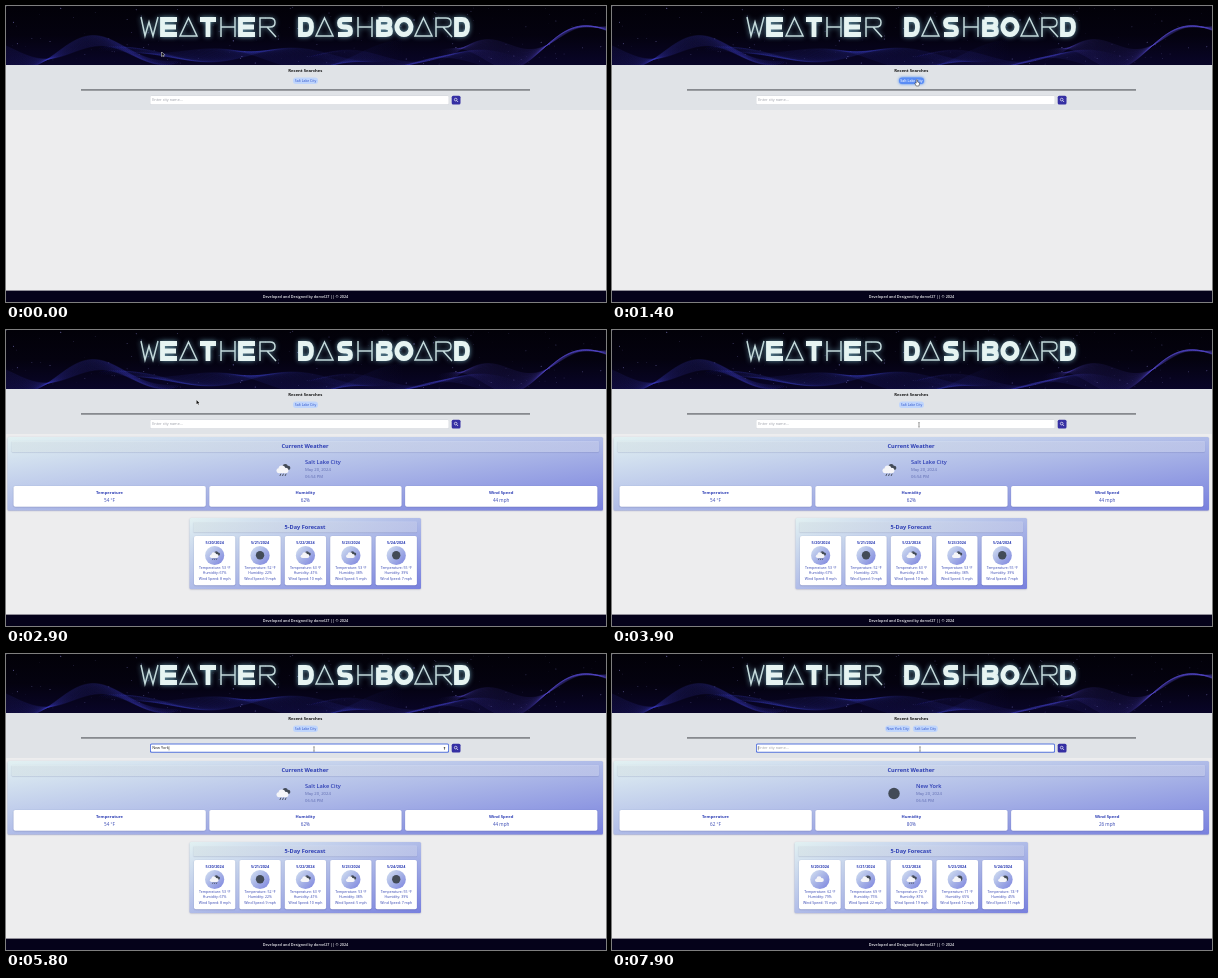
Write an HTML page with a canvas that moves like this. It is 600 by 296 pixels and loops after 8 s.

```html
<!DOCTYPE html>
<html lang="en">
<head>
<meta charset="utf-8">
<title>Weather Dashboard</title>
<style>
html, body { margin: 0; width: 100%; height: 100%; overflow: hidden; background: #ededee; }
canvas { display: block; width: 600px; height: 296px; }
</style>
</head>
<body>
<canvas id="stage"></canvas>
<script>
const W = 600, H = 296, LOOP = 8000;
const FONT = '"Open Sans", "Noto Sans", sans-serif';
const BLUE = '#2c3db4';
const canvas = document.getElementById('stage');
const dpr = window.devicePixelRatio || 1;
canvas.width = W * dpr;
canvas.height = H * dpr;
let ctx = canvas.getContext('2d');

const SALT_LAKE = {
  city: 'Salt Lake City', icon: 'rain', x: 299, now: ['54 °F', '62%', '44 mph'], grow: 0,
  days: [['rain', 53, 67, 8], ['moon', 52, 22, 9], ['cloud', 63, 41, 10], ['cloud', 53, 38, 5], ['moon', 55, 39, 7]]
};
const NEW_YORK = {
  city: 'New York', icon: 'moon', x: 304, now: ['62 °F', '80%', '26 mph'], grow: 1,
  days: [['white', 62, 79, 15], ['night', 69, 75, 22], ['rain', 72, 81, 19], ['night', 71, 65, 12], ['night', 74, 45, 11]]
};
const SUGGESTIONS = ['denver', 'Street, address', 'salt lake city', 'valley, area', 'venice', 'salt lake city'];
const QUERY = 'New York City';
const SHOW_FIRST = 1450, FOCUS = 4100, TYPE_START = 4900, TYPE_STEP = 125, SUBMIT = 7400, SHOW_SECOND = 7500;
const POINTER = [[0, 156, 48], [1250, 305, 76], [2000, 305, 76], [2750, 191, 72], [3050, 191, 72], [3950, 308, 95], [LOOP, 308, 95]];

function random(seed) {
  return () => (seed = (seed * 16807) % 2147483647) / 2147483647;
}

function text(str, x, y, size, color, weight = 400, align = 'center') {
  ctx.font = `${weight} ${size}px ${FONT}`;
  ctx.textAlign = align;
  ctx.textBaseline = 'middle';
  ctx.fillStyle = color;
  ctx.fillText(str, x, y);
}

function box(x, y, w, h, r, fill, shadow = 0) {
  ctx.save();
  if (shadow) {
    ctx.shadowColor = 'rgba(30,35,100,.3)';
    ctx.shadowBlur = shadow * dpr;
    ctx.shadowOffsetY = 0.5 * dpr;
  }
  ctx.fillStyle = fill;
  ctx.beginPath();
  ctx.roundRect(x, y, w, h, r);
  ctx.fill();
  ctx.restore();
}

function disc(x, y, r, fill) {
  ctx.fillStyle = fill;
  ctx.beginPath();
  ctx.arc(x, y, r, 0, 7);
  ctx.fill();
}

function line(points, color, width) {
  ctx.strokeStyle = color;
  ctx.lineWidth = width;
  ctx.beginPath();
  points.forEach(([x, y]) => ctx.lineTo(x, y));
  ctx.stroke();
}

// Corner-to-corner gradient, like CSS "to bottom right".
function cornerGradient(x, y, w, h, ...colors) {
  const k = w * h / (w * w + h * h), cx = x + w / 2, cy = y + h / 2;
  const g = ctx.createLinearGradient(cx - h * k, cy - w * k, cx + h * k, cy + w * k);
  colors.forEach((c, i) => g.addColorStop(i / (colors.length - 1), c));
  return g;
}

// Banner

function ribbon(x0, x1, count, rgb, alpha, height) {
  const g = ctx.createLinearGradient(x0, 0, x1, 0);
  g.addColorStop(0, `rgba(${rgb},${x0 > 0 ? 0 : alpha})`);
  g.addColorStop(0.3, `rgba(${rgb},${alpha})`);
  g.addColorStop(0.75, `rgba(${rgb},${alpha})`);
  g.addColorStop(1, `rgba(${rgb},${x1 < W ? 0 : alpha})`);
  for (let i = 0; i < count; i++) {
    const points = [];
    for (let x = x0; x <= x1; x += 2) points.push([x, height(x, i / count)]);
    line(points, g, 0.4);
  }
}

const GLYPHS = {
  W: 'M0 0L4 19L8 5L12 19L17 0',
  E: 'M17 2.5H2.5V17.5H17M3 10H16',
  A: 'M8.5 1L17 19H0Z',
  T: 'M0 2.5H16M8 2.5V20',
  H: 'M1 0V20M15 0V20M1 10H15',
  R: 'M1 20V1H11Q16 1 16 5.5Q16 10 11 10H1M8 10L17 20',
  D: 'M2.5 2.5H8Q13.5 2.5 13.5 10Q13.5 17.5 8 17.5H2.5Z',
  S: 'M15 2.5H6Q2.5 2.5 2.5 6Q2.5 10 7 10H9Q13.5 10 13.5 14Q13.5 17.5 10 17.5H1',
  B: 'M2.5 2.5H10Q14 2.5 14 6Q14 10 9 10H2.5M9 10Q14.5 10 14.5 14Q14.5 17.5 10 17.5H2.5V2.5',
  O: 'M9 2.5A7 7.5 0 1 1 8.9 2.5Z'
};
const TITLE = [['WEATHER', [135, 154, 174, 194, 214, 232, 253]], ['DASHBOARD', [292, 310, 331, 351, 370, 389, 409, 429, 448]]];

function drawTitle() {
  for (const [word, xs] of TITLE) {
    [...word].forEach((ch, i) => {
      const path = new Path2D(GLYPHS[ch]), solid = 'ETDSBO'.includes(ch);
      ctx.save();
      ctx.translate(xs[i], 11);
      ctx.lineJoin = 'miter';
      ctx.shadowColor = 'rgba(120,180,200,.8)';
      ctx.shadowBlur = 5 * dpr;
      ctx.strokeStyle = solid ? '#e6f4f2' : '#c4dadb';
      ctx.lineWidth = solid ? 4.8 : 1.5;
      ctx.stroke(path);
      ctx.restore();
    });
  }
}

function drawBanner() {
  const sky = ctx.createLinearGradient(0, 0, 0, 59);
  sky.addColorStop(0, '#020108');
  sky.addColorStop(0.5, '#04020f');
  sky.addColorStop(1, '#090528');
  ctx.fillStyle = sky;
  ctx.fillRect(0, 0, W, 59);
  ctx.save();
  ctx.beginPath();
  ctx.rect(0, 0, W, 59);
  ctx.clip();
  ribbon(0, 175, 22, '60,60,200', 0.28, (x, k) => 43 + 8 * Math.sin(x / 19 + 5.9 + k * 0.9) + k * 13 * Math.cos(x / 34) + x * 0.05);
  ribbon(90, 400, 24, '55,60,195', 0.25, (x, k) => 49 + 7 * Math.sin(x / 26 + k * 2.2) + k * 9 * Math.sin(x / 41 + 1));
  ribbon(300, 520, 18, '60,58,190', 0.25, (x, k) => 50 + 6 * Math.sin(x / 21 + 1 + k * 1.8) + k * 8);
  ribbon(430, 600, 24, '85,72,210', 0.28, (x, k) => 48 - (x - 430) * 0.13 + 8 * Math.sin(x / 16 + k * 1.3) + k * 17 * Math.cos(x / 40));
  const rnd = random(4217);
  for (let i = 0; i < 160; i++) {
    disc(rnd() * W, rnd() * 58, 0.15 + rnd() * 0.4, `rgba(165,160,250,${0.2 + rnd() * 0.6})`);
  }
  ctx.restore();
  drawTitle();
}

function prerender(draw) {
  const layer = document.createElement('canvas'), main = ctx;
  layer.width = canvas.width;
  layer.height = Math.ceil(59 * dpr);
  ctx = layer.getContext('2d');
  ctx.scale(dpr, dpr);
  draw();
  ctx = main;
  return layer;
}

// Weather

function cloud(x, y, s, color) {
  disc(x - 2.8 * s, y + 0.8 * s, 2 * s, color);
  disc(x - 0.4 * s, y - 0.8 * s, 2.7 * s, color);
  disc(x + 2.7 * s, y + 0.6 * s, 2.2 * s, color);
  ctx.fillRect(x - 2.8 * s, y, 5.5 * s, 2.8 * s);
}

function weatherIcon(kind, x, y, s) {
  const dark = '#434b57';
  if (kind === 'moon') return disc(x, y, 4.4 * s, dark);
  if (kind === 'night') disc(x + 2.2 * s, y - 0.8 * s, 3.2 * s, dark);
  if (kind === 'rain' || kind === 'cloud') cloud(x + 2 * s, y - 1.7 * s, 0.75 * s, dark);
  cloud(x - 0.5 * s, y + 0.2 * s, 0.95 * s, '#f5f5f8');
  if (kind === 'rain') {
    for (let i = -1; i < 2; i++) {
      const dx = x + i * 2 * s;
      line([[dx + 0.4 * s, y + 3.2 * s], [dx - 0.4 * s, y + 5 * s]], dark, 0.7 * s);
    }
  }
}

function panel(x, y, w, h) {
  box(x, y, w, h, 1.5, cornerGradient(x, y, w, h, '#e2f1f2', '#b0bce8', '#7880de'), 1.5);
}

function heading(str, x, y, w) {
  const g = ctx.createLinearGradient(x, 0, x + w, 0);
  g.addColorStop(0, 'rgba(230,243,243,.7)');
  g.addColorStop(1, 'rgba(205,213,245,.7)');
  box(x, y, w, 11, 1, g, 1);
  text(str, 299, y + 6, 5.6, BLUE, 700);
}

function drawWeather(data) {
  panel(1.5, 107, 595.5, 73.5);
  heading('Current Weather', 5.5, 111, 587.5);
  weatherIcon(data.icon, data.x - 22, 139.5, 1.3);
  text(data.city, data.x, 132.6, 5.6, BLUE, 600, 'left');
  text('May 20, 2024', data.x, 139.8, 4.2, '#5f6cb2', 400, 'left');
  text('06:54 PM', data.x, 146.5, 4.2, '#5f6cb2', 400, 'left');
  ['Temperature', 'Humidity', 'Wind Speed'].forEach((label, i) => {
    const x = 7.5 + i * 195.8;
    box(x, 156, 192.3, 20.7, 1.8, '#fff', 1.5);
    text(label, x + 96, 163.4, 4.2, BLUE, 700);
    text(data.now[i], x + 96, 170.5, 4.6, '#3546b2');
  });

  const g = data.grow;
  panel(183.5 - g, 188, 231.5 + 2 * g, 71);
  heading('5-Day Forecast', 187.5 - g, 191.5, 223.5 + 2 * g);
  data.days.forEach(([icon, temp, humidity, wind], i) => {
    const w = 41.3 + g * 0.4, x = 188 - g + i * (45.4 + g * 0.4), cx = x + w / 2;
    box(x, 206, w, 49.3, 1.8, '#fff', 1.5);
    text(`5/${20 + i}/2024`, cx, 213, 3.8, BLUE, 700);
    disc(cx, 225.5, 9.6, cornerGradient(cx - 9.6, 216, 19.2, 19.2, '#d6e3f2', '#a6b2e6', '#7b82df'));
    weatherIcon(icon, cx, 225.3, 0.95);
    text(`Temperature: ${temp} °F`, cx, 237.7, 3.5, '#3142b0');
    text(`Humidity: ${humidity}%`, cx, 243.4, 3.5, '#3142b0');
    text(`Wind Speed: ${wind} mph`, cx, 249.1, 3.5, '#3142b0');
  });
}

// Search

function pill(label, cx, hover) {
  ctx.save();
  if (hover) {
    ctx.shadowColor = '#3b82f6';
    ctx.shadowBlur = 3 * dpr;
  }
  box(cx - 12.5, 71.5, 25, 6.4, 3, hover ? '#5b8df5' : '#bfd5fc');
  ctx.restore();
  text(label, cx, 74.8, 3.5, hover ? '#e6efff' : '#2b50c8', hover ? 600 : 400);
}

function drawInput(t, typed) {
  const focused = t >= FOCUS;
  box(144, 89.5, 299, 9.2, 1.5, focused ? '#5674dd' : '#d3d6dc');
  const inset = focused ? 0.9 : 0.4;
  box(144 + inset, 89.5 + inset, 299 - 2 * inset, 9.2 - 2 * inset, 1, '#fff');
  text(typed || 'Enter city name...', 146.2, 94.3, 3.8, typed ? '#202026' : '#9a9da6', 400, 'left');
  if (focused) {
    const end = typed ? 146.4 + ctx.measureText(typed).width : 146.3;
    line([[end, 92.2], [end, 96.4]], '#222', 0.4);
  }
  if (focused && t < SUBMIT) {
    disc(438.5, 93.7, 0.8, '#444');
    line([[438.5, 94], [438.5, 95.8]], '#444', 0.6);
  }
  box(445.7, 89.8, 8.8, 8.7, 1.5, '#352fa3');
  ctx.strokeStyle = '#fff';
  ctx.lineWidth = 0.65;
  ctx.beginPath();
  ctx.arc(449.7, 93.6, 1.35, 0, 7);
  ctx.stroke();
  line([[450.7, 94.6], [452.1, 96]], '#fff', 0.7);
}

function drawSuggestions() {
  ctx.fillStyle = '#898b8e';
  ctx.beginPath();
  ctx.moveTo(168.8, 102.5);
  ctx.lineTo(171, 100);
  ctx.lineTo(173.2, 102.5);
  ctx.fill();
  box(168, 102.3, 35, 50.7, 1.5, 'rgba(132,134,138,.97)', 2);
  SUGGESTIONS.forEach((s, i) => text(s, 170.5, 107.2 + i * 8.2, 3, '#f2f2f2', 400, 'left'));
}

// Pointer

function pointerAt(t) {
  const i = POINTER.findIndex(([time]) => time > t);
  const [t0, x0, y0] = POINTER[i - 1], [t1, x1, y1] = POINTER[i];
  const k = (t - t0) / (t1 - t0), e = k * k * (3 - 2 * k);
  return { x: x0 + (x1 - x0) * e, y: y0 + (y1 - y0) * e };
}

const inside = (p, x, y, w, h) => p.x >= x && p.x <= x + w && p.y >= y && p.y <= y + h;

function drawPointer(p, overPill) {
  ctx.save();
  ctx.translate(p.x, p.y);
  if (overPill) {
    const hand = new Path2D('M-.8 -2Q0 -2.8.6 -2V0L2.2.5Q2.8.8 2.5 2L1.8 4H-.8L-2.2 1.3Q-2 .6-.8 1.2Z');
    ctx.fillStyle = '#fff';
    ctx.fill(hand);
    ctx.strokeStyle = '#222';
    ctx.lineWidth = 0.5;
    ctx.stroke(hand);
  } else if (inside(p, 144, 89.5, 299, 9)) {
    line([[0, -2], [0, 2]], '#333', 0.5);
    line([[-0.9, -2.2], [0.9, -2.2]], '#333', 0.4);
    line([[-0.9, 2.2], [0.9, 2.2]], '#333', 0.4);
  } else {
    const arrow = new Path2D('M-.5 -2V2.2L.5 1.3L1.2 2.7L1.9 2.3L1.2 1H2.4Z');
    ctx.strokeStyle = '#fff';
    ctx.lineWidth = 0.9;
    ctx.stroke(arrow);
    ctx.fillStyle = '#111';
    ctx.fill(arrow);
  }
  ctx.restore();
}

const banner = prerender(drawBanner);

function render(t) {
  ctx.setTransform(dpr, 0, 0, dpr, 0, 0);
  ctx.fillStyle = '#ededee';
  ctx.fillRect(0, 0, W, H);
  ctx.fillStyle = '#e0e3e7';
  ctx.fillRect(0, 59, W, 45);
  ctx.drawImage(banner, 0, 0, W, 59);

  const p = pointerAt(t);
  const overPill = inside(p, 286.5, 71.5, 25, 6.4);
  const count = t < SUBMIT ? Math.max(0, Math.floor((t - TYPE_START) / TYPE_STEP) + 1) : 0;
  text('Recent Searches', 299.3, 64.8, 4.2, '#111', 700);
  if (t >= SHOW_SECOND) {
    pill(QUERY, 285.7, false);
    pill('Salt Lake City', 313.3, false);
  } else {
    pill('Salt Lake City', 299.5, overPill);
  }
  ctx.fillStyle = '#303238';
  ctx.fillRect(75, 83.5, 449, 0.9);
  drawInput(t, QUERY.slice(0, count));
  if (t >= SHOW_FIRST) drawWeather(t < SHOW_SECOND ? SALT_LAKE : NEW_YORK);
  if (count === 1 || count === 2) drawSuggestions();

  ctx.fillStyle = '#05021a';
  ctx.fillRect(0, 284.6, W, 11.4);
  text('Developed and Designed by dorvel27 || © 2024', 299.5, 291.5, 3.75, '#f2f2f5', 600);
  drawPointer(p, overPill);
}

function tick() {
  render(performance.now() % LOOP);
  requestAnimationFrame(tick);
}
tick();
</script>
</body>
</html>
```
